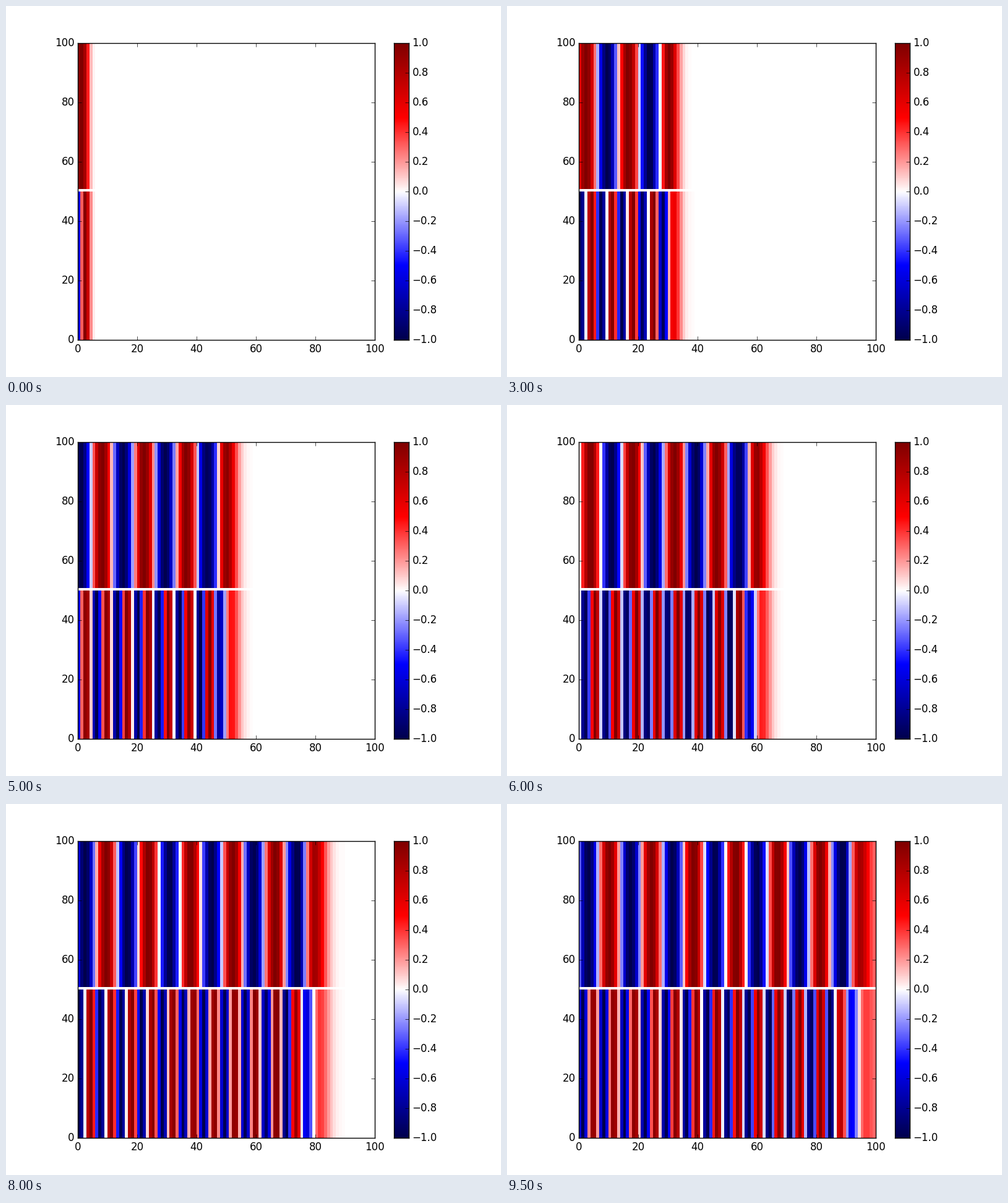
These frames come from a looping animation (800x600 px, 10000 ms). A matplotlib script:

```python
import numpy as np
import matplotlib.pyplot as plt
from matplotlib.animation import FuncAnimation

WIDTH, HEIGHT, DPI = 800, 600, 100
CELLS = 100
WALL = CELLS // 2          # silent row between the two waves
FRAMES, INTERVAL = 20, 500
STEPS_PER_FRAME = 10
COURANT = 0.5

plt.rcParams.update({
    "font.family": "DejaVu Sans",
    "font.size": 12,
    "text.hinting": "auto",
    "text.hinting_factor": 8,
    "text.kerning_factor": 6,
    "ytick.alignment": "center",
    "axes.linewidth": 1.0,
    "axes.axisbelow": False,
    "figure.facecolor": "white",
    "savefig.facecolor": "white",
})


def simulate(omega):
    """Staggered-grid wave driven by a sine at the left; one row per frame."""
    electric = np.zeros(CELLS + 1)
    magnetic = np.zeros(CELLS)
    rows = []
    for n in range(FRAMES * STEPS_PER_FRAME):
        electric[1:-1] -= COURANT * np.diff(magnetic)
        electric[0] = np.sin(omega * n)
        magnetic -= COURANT * np.diff(electric)
        if (n + 1) % STEPS_PER_FRAME == 0:
            rows.append(magnetic.copy())
    return rows


def add_axes(left, bottom, width, height):
    return fig.add_axes([left / WIDTH, bottom / HEIGHT,
                         width / WIDTH, height / HEIGHT])


slow = simulate(0.07 * np.pi)
fast = simulate(0.14 * np.pi)


def field_at(frame):
    field = np.zeros((CELLS, CELLS))
    field[:WALL] = fast[frame]
    field[WALL + 1:] = slow[frame]
    return field


fig = plt.figure(figsize=(WIDTH / DPI, HEIGHT / DPI), dpi=DPI)
# An odd number of colours keeps zero pure white.
colors = dict(cmap=plt.get_cmap("seismic", 257), vmin=-1, vmax=1)
ticks = dict(direction="in", length=4, width=0.5, pad=4)

ax = add_axes(116, 60, 480, 480)
# The small offset makes cell borders round down to whole pixels.
edges = np.arange(CELLS + 1) - 1 / 12
mesh = ax.pcolormesh(edges, edges, field_at(0), **colors)
ax.set(xlim=(0, CELLS), ylim=(0, CELLS),
       xticks=range(0, 101, 20), yticks=range(0, 101, 20))
ax.tick_params(top=True, right=True, **ticks)

bar = add_axes(627, 60, 24, 480)
levels = np.linspace(-1, 1, 257)
centers = (levels[:-1] + levels[1:]) / 2
bar.pcolormesh([0, 1], levels, centers[:, None], **colors)
values = np.arange(-5, 6) / 5
bar.set(xlim=(0, 1), ylim=(-1, 1), xticks=[], yticks=values)
bar.set_yticklabels([f"{v:.1f}".replace("-", "\u2212") for v in values])
bar.yaxis.tick_right()
bar.tick_params(**ticks)


def update(frame):
    mesh.set_array(field_at(frame))
    return [mesh]


anim = FuncAnimation(fig, update, frames=FRAMES, interval=INTERVAL,
                     repeat=True, repeat_delay=0)
plt.show()
```
